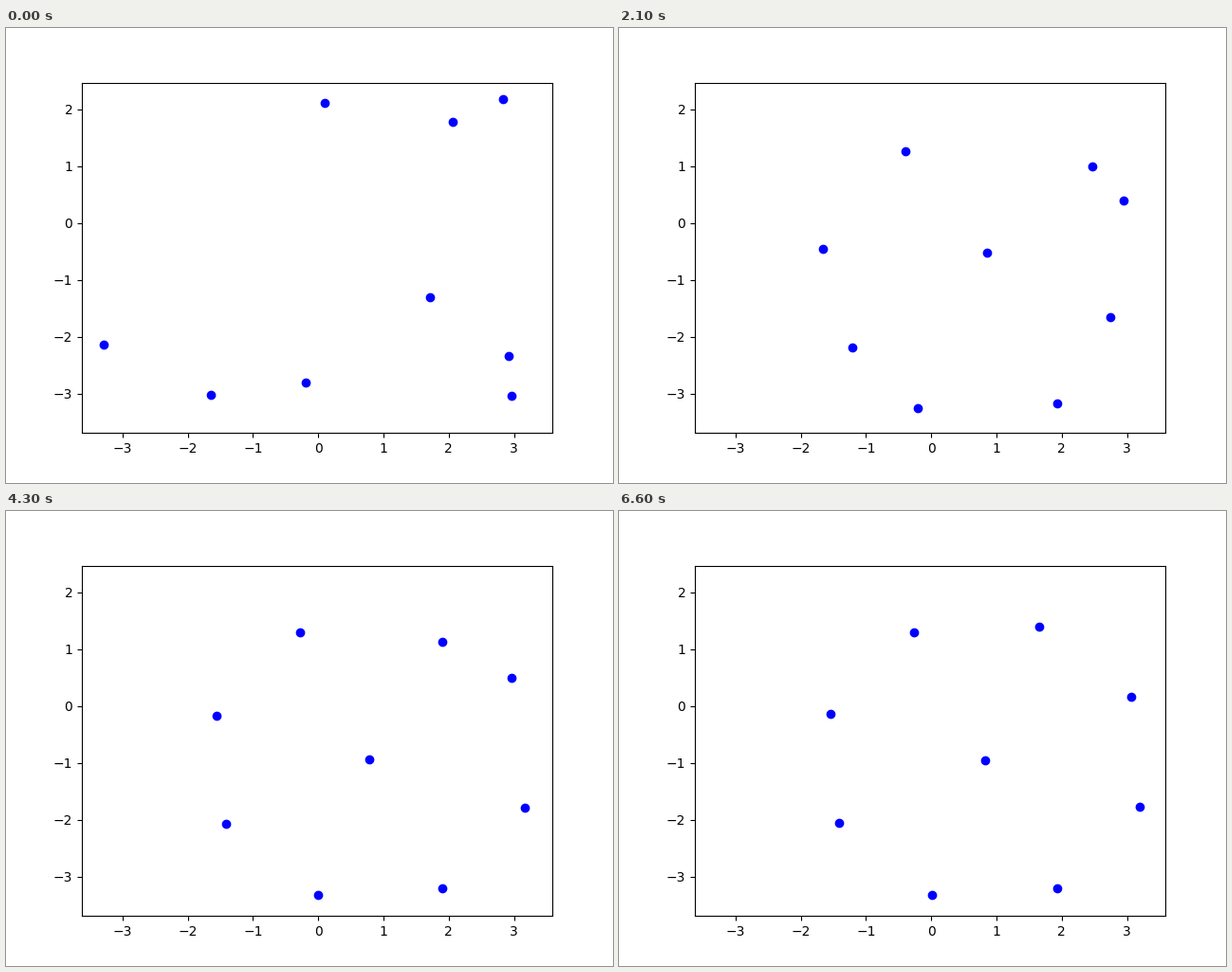
Recreate the animation shown at these times as a matplotlib script. Size 640 by 480 pixels, loop 6.7 s.

```python
import numpy as np
import matplotlib.pyplot as plt
from matplotlib.animation import FuncAnimation

FRAMES, INTERVAL = 67, 100
GAIN, RADIUS = 0.03, 2.5

# Axes geometry in pixels, y counted downwards.
ORIGIN = np.array([329.25, 205.75])
SCALE = np.array([68.8, -60.0])
CORNERS = np.array([[80, 427.2], [576, 57.6]])

# Starting pixels: eight ring agents in order, then the hub.
START = [(336, 79), (530, 346), (471, 99), (447, 284), (533, 388),
         (216, 387), (316, 374), (103, 334), (524, 75)]


def to_data(px):
    return (np.array(px) - ORIGIN) / SCALE


def offsets(p):
    """Vectors from each agent to every other one, and their lengths."""
    diff = p[None] - p[:, None]
    return diff, np.hypot(diff[..., 0], diff[..., 1])


# Wanted formation: a regular octagon around a hub.
angle = np.arange(8) * np.pi / 4
octagon = RADIUS * np.c_[np.cos(angle), np.sin(angle)]
wanted = offsets(np.vstack([octagon, [0, 0]]))[1]


def step(p):
    """Move along linear springs towards the wanted distances."""
    diff, dist = offsets(p)
    pull = (dist - wanted) / np.maximum(dist, 1e-9)
    return p + GAIN * (pull[..., None] * diff).sum(axis=1)


path = [to_data(START)]
while len(path) < FRAMES:
    path.append(step(path[-1]))

fig, ax = plt.subplots(figsize=(6.4, 4.8), dpi=100)
(left, bottom), (right, top) = to_data(CORNERS)
ax.set_xlim(left, right)
ax.set_ylim(bottom, top)
dots, = ax.plot([], [], "bo")


def draw(i):
    dots.set_data(*path[i].T)
    return dots,


anim = FuncAnimation(fig, draw, frames=FRAMES, interval=INTERVAL,
                     repeat=True, repeat_delay=0)
plt.show()
```
